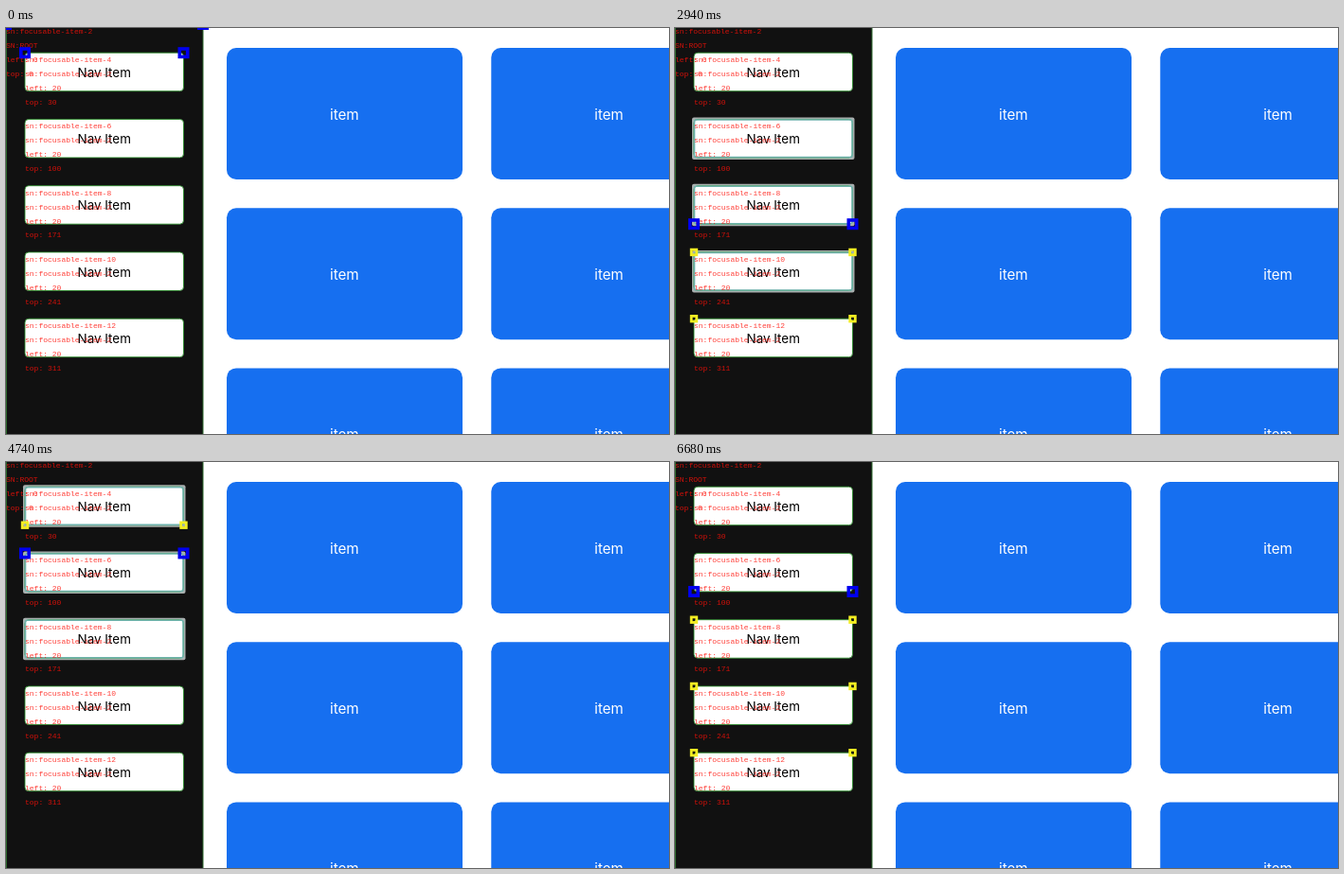
Write an HTML page with a canvas that moves like this. It is 700 px wide and 429 px high and loops after 6700 ms.

```html
<!DOCTYPE html>
<html>
<head>
<meta charset="utf-8">
<style>
  html, body { margin: 0; width: 100%; height: 100%; overflow: hidden; background: #fff; }
  canvas { display: block; }
</style>
</head>
<body>
<canvas id="stage" width="700" height="429"></canvas>
<script>
const ctx = document.getElementById('stage').getContext('2d');
const LOOP = 6700;
const COUNT = 5;
const NAV = { x: 0, y: -4, w: 208, h: 440 };
const ITEM = { x: 20, w: 167.5, h: 40.5 };
const RING_HOLD = 350, RING_FADE = 100;

// Key presses: time, item focused at that moment, direction (1 down, -1 up)
const presses = [
  [0, 0, -1],
  [2300, 0, 1], [2620, 1, 1], [2880, 2, 1], [3100, 3, 1], [3360, 4, 1],
  [3960, 4, -1], [4200, 3, -1], [4430, 2, -1], [4680, 1, -1], [4940, 0, -1],
  [5700, 0, 1], [6200, 1, 1]
].map(([time, from, dir]) => ({ time, from, dir, to: from + dir }));

const inList = i => i >= 0 && i < COUNT;
const itemTop = i => 26.2 + 70.25 * i;

function box(x, y, w, h, r) {
  ctx.beginPath();
  ctx.roundRect(x, y, w, h, r);
}

function label(text, x, y, size, color) {
  ctx.font = `${size}px Inter, sans-serif`;
  ctx.textAlign = 'center';
  ctx.textBaseline = 'alphabetic';
  ctx.fillStyle = color;
  ctx.fillText(text, x, y);
}

function debugText(x, y, lines) {
  ctx.font = '8px "Liberation Mono", monospace';
  ctx.textAlign = 'left';
  ctx.textBaseline = 'alphabetic';
  ctx.fillStyle = 'rgba(255, 16, 8, 0.8)';
  lines.forEach((line, n) => ctx.fillText(line, x, y + 10 + n * 14.9));
}

function drawCards() {
  for (let row = 0; row < 3; row++) {
    for (let col = 0; col < 2; col++) {
      const x = 233 + col * 279.3, y = 21 + row * 169.2;
      box(x, y, 249, 139, 10);
      ctx.fillStyle = '#166ff0';
      ctx.fill();
      label('item', x + 124.3, y + 75.5, 15.2, '#fff');
    }
  }
}

function ringAlpha(i, t) {
  const last = presses.filter(p => p.time <= t && inList(p.to) && (p.from === i || p.to === i)).pop();
  if (!last) return 0;
  const fade = (t - last.time - RING_HOLD) / RING_FADE;
  return 1 - Math.min(1, Math.max(0, fade));
}

function drawItem(i, t) {
  const { x, w, h } = ITEM, y = itemTop(i);
  const ring = ringAlpha(i, t);
  if (ring > 0) {
    ctx.globalAlpha = ring;
    box(x - 2, y - 2, w + 4, h + 4, 2);
    ctx.fillStyle = '#a9b0b0';
    ctx.fill();
    ctx.globalAlpha = 1;
  }
  box(x, y, w, h, 4);
  ctx.fillStyle = '#fff';
  ctx.fill();
  ctx.lineWidth = 1;
  ctx.strokeStyle = 'rgba(40, 140, 40, 0.85)';
  ctx.stroke();
  if (ring > 0) {
    ctx.globalAlpha = ring;
    box(x + 0.5, y + 0.5, w - 1, h - 1, 2);
    ctx.lineWidth = 1.6;
    ctx.strokeStyle = '#6fb3ad';
    ctx.stroke();
    ctx.globalAlpha = 1;
  }
  label('Nav Item', x + w / 2, y + 25.6, 13.4, '#000');
}

function drawNav(t) {
  ctx.fillStyle = '#111';
  ctx.fillRect(NAV.x, NAV.y, NAV.w, NAV.h);
  ctx.lineWidth = 1;
  ctx.strokeStyle = '#2c6a2c';
  ctx.strokeRect(NAV.x + 0.5, NAV.y, NAV.w - 0.5, NAV.h);
  for (let i = 0; i < COUNT; i++) drawItem(i, t);

  debugText(0, NAV.y, ['sn:focusable-item-2', 'SN:ROOT', 'left: 0', 'top: 0']);
  for (let i = 0; i < COUNT; i++) {
    const y = itemTop(i);
    debugText(ITEM.x, y, [
      `sn:focusable-item-${4 + 2 * i}`,
      'sn:focusable-item-2',
      'left: 20',
      `top: ${Math.round(y + 4)}`
    ]);
  }
}

function corners(x, y, w, size, line, color) {
  ctx.strokeStyle = color;
  ctx.lineWidth = line;
  for (const cx of [x, x + w]) ctx.strokeRect(cx - size / 2, y - size / 2, size, size);
}

function itemEdge(i, atBottom, ...style) {
  corners(ITEM.x, itemTop(i) + (atBottom ? ITEM.h : 0), ITEM.w, ...style);
}

function drawCorners(t) {
  const { from, dir, to } = presses.filter(p => p.time <= t).pop();
  for (let i = to; inList(i); i += dir) itemEdge(i, dir < 0, 5.6, 2.8, '#f4ee22');
  itemEdge(from, dir > 0, 8.4, 3.6, '#0000f0');
  if (to < 0) corners(NAV.x, NAV.y, NAV.w, 8.4, 3.6, '#0000f0');
}

function frame(now) {
  const t = now % LOOP;
  ctx.fillStyle = '#fff';
  ctx.fillRect(0, 0, 700, 429);
  drawCards();
  drawNav(t);
  drawCorners(t);
  requestAnimationFrame(frame);
}
requestAnimationFrame(frame);
</script>
</body>
</html>
```
